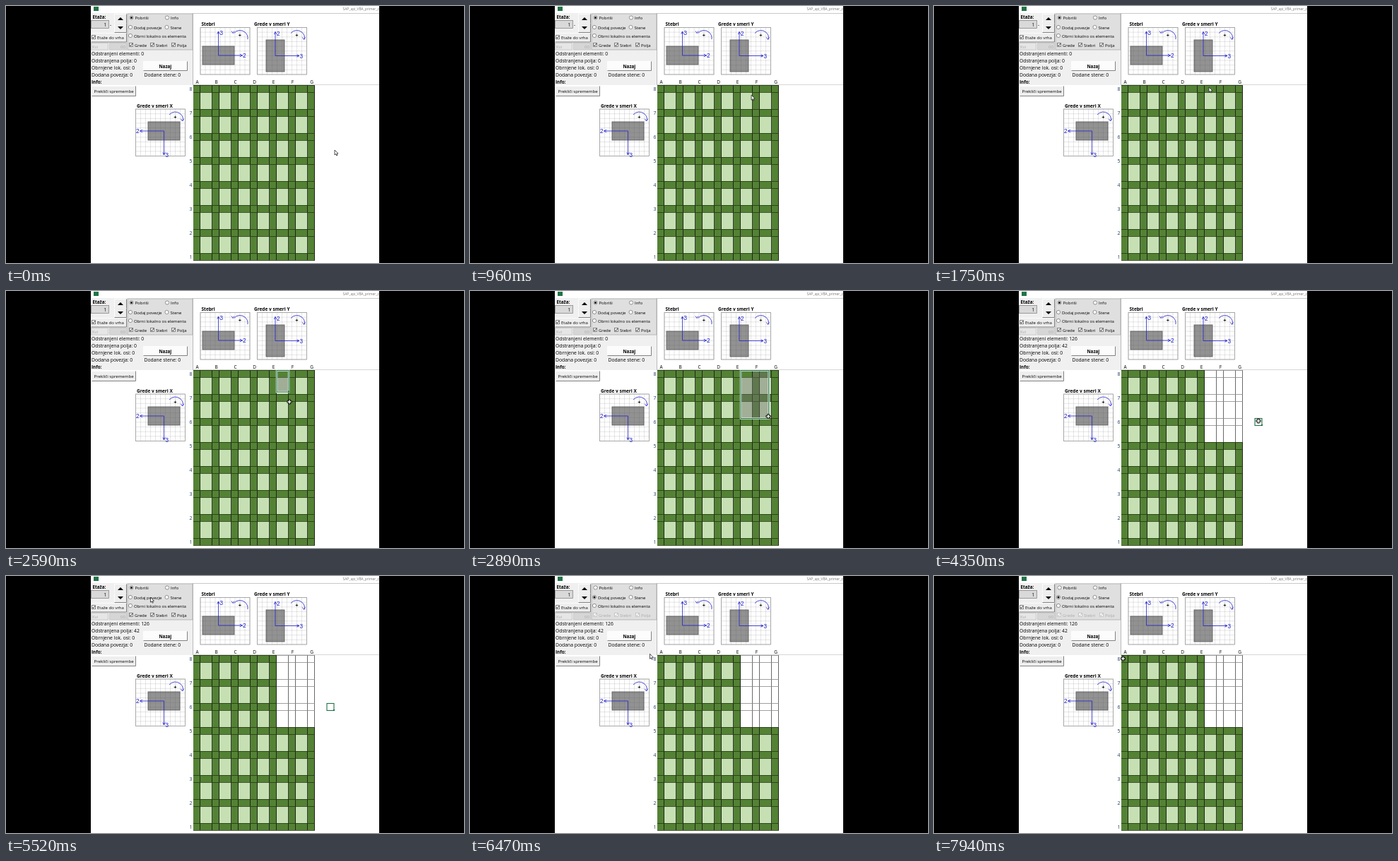
Write an HTML page with a canvas that moves like this. It is 648 px wide and 364 px high and loops after 8000 ms.

```html
<!DOCTYPE html>
<html lang="sl">
<head>
<meta charset="utf-8">
<style>
html, body { margin: 0; width: 100%; height: 100%; overflow: hidden; background: #000 }
canvas { display: block }
</style>
</head>
<body>
<canvas id="stage" width="648" height="364"></canvas>
<script>
const c = document.getElementById('stage').getContext('2d');
const LOOP = 8000, BLUE = '#2020d0', FONT = '"Open Sans", sans-serif';
const DRAG = 2410, CLEAR = 3530, CLICK = 4170, LINK = 5840;
const LEFT = 265, TOP = 112, COL = 27, ROW = 34, BEAM = 10;

// start, end, destination of each pointer move
const home = [465, 204];
const moves = [
  [330, 1110, 391, 118], [1140, 1430, 389, 115], [DRAG, 2590, 401, 157],
  [2590, 3200, 444, 199], [CLEAR, 4010, 459, 184], [4350, 4950, 293, 110],
  [4980, 5580, 202, 28], [LINK, 6620, 260, 119], [6650, 6920, 267.5, 117]
];

function pointerAt(t) {
  let [x, y] = home;
  for (const [start, end, toX, toY] of moves) {
    const u = Math.min(1, Math.max(0, (t - start) / (end - start))), e = u * u * (3 - 2 * u);
    x += (toX - x) * e;
    y += (toY - y) * e;
  }
  return [x, y];
}

// near and far edge of the sheet cell around v
function span(v, origin, pitch) {
  const start = origin + Math.floor((v - origin) / pitch) * pitch, mid = start + BEAM;
  return v < mid ? [start, mid] : [mid, start + pitch];
}

function box(x, y, w, h, fill, line) {
  if (fill) { c.fillStyle = fill; c.fillRect(x, y, w, h); }
  if (line) { c.strokeStyle = line; c.strokeRect(x, y, w, h); }
}

function text(s, x, y, size = 6.1, color = '#000', weight = 400, family = FONT) {
  c.font = `${weight} ${size}px ${family}`;
  c.fillStyle = color;
  c.fillText(s, x, y);
}

function path(points, fill, line, close) {
  c.beginPath();
  points.forEach(([x, y]) => c.lineTo(x, y));
  if (close) c.closePath();
  if (fill) { c.fillStyle = fill; c.fill(); }
  if (line) { c.strokeStyle = line; c.stroke(); }
}

function button(x, y, w, h, fill = '#eee') {
  box(x, y, w, h, fill);
  path([[x, y + h], [x, y], [x + w, y]], null, '#fff');
  path([[x + w, y], [x + w, y + h], [x, y + h]], null, '#666');
}

function dot(x, y, r, fill, line) {
  c.beginPath();
  c.arc(x, y, r, 0, 7);
  c.fillStyle = fill;
  c.fill();
  if (line) { c.strokeStyle = line; c.stroke(); }
}

function radio(x, y, label, on) {
  dot(x, y, 2.6, '#fff', '#777');
  if (on) dot(x, y, 1.5, '#000');
  text(label, x + 5, y + 2.5, 6);
}

function check(x, y, label, off) {
  const color = off ? '#aaa' : '#000';
  box(x - 2.5, y - 2.5, 5, 5, '#fff', off ? '#bbb' : '#666');
  path([[x - 1.7, y], [x - .5, y + 1.5], [x + 1.9, y - 1.8]], null, color);
  text(label, x + 5, y + 2.5, 6, color);
}

function arrow(x0, y0, x, y) {
  const a = Math.atan2(y - y0, x - x0);
  const wing = d => [x - 4 * Math.cos(a + d), y - 4 * Math.sin(a + d)];
  path([[x0, y0], [x, y]], null, BLUE);
  path([wing(.45), [x, y], wing(-.45)], null, BLUE);
}

// a section centred on (ox, oy) with two labelled axes and its turning sense
function diagram(title, tx, x, y, ox, oy, w, h, axes, ccw) {
  const W = 70, H = 66.5, block = [ox - w / 2, oy - h / 2, w, h];
  text(title, tx, y - 2.5, 6.5, '#000', 700);
  box(x, y, W, H, '#fff');
  box(...block, '#929292');
  c.lineWidth = .6;
  for (let i = 0; i <= 10; i++) {
    const gx = x + i * W / 10, gy = y + i * H / 10;
    path([[gx, y], [gx, y + H]], null, 'rgba(90,90,90,.25)');
    path([[x, gy], [x + W, gy]], null, 'rgba(90,90,90,.25)');
  }
  c.lineWidth = .8;
  box(x, y, W, H, null, '#999');
  box(...block, null, '#555');
  for (const [label, dx, dy] of axes) {
    const ex = ox + 34 * dx, ey = oy + 34 * dy;
    arrow(ox, oy, ex, ey);
    text(label, ex + (dx < 0 ? -5.5 : dx ? .5 : 2), ey + (dy < 0 ? 5 : 3), 8.2, BLUE, 400, '"Liberation Sans", sans-serif');
  }
  const cx = x + 56, cy = y + 15, s = ccw ? -1 : 1, tip = [cx + 10 * s, cy + (ccw ? -7 : 2)];
  c.beginPath();
  c.arc(cx, cy, 11, -2.45, .15);
  c.strokeStyle = BLUE;
  c.stroke();
  path([[tip[0] - 2 * s, tip[1] - 3], tip, [tip[0] + 2 * s, tip[1] - 3]], null, BLUE);
  text('+', cx - 2.3, cy - 1.5, 7.5, '#000', 700);
}

function plan(cleared) {
  for (let r = 0; r < 15; r++) for (let k = 0; k < 13; k++) {
    const x = LEFT + COL * (k >> 1) + k % 2 * BEAM, y = TOP + ROW * (r >> 1) + r % 2 * BEAM;
    const w = k % 2 ? COL - BEAM : BEAM, h = r % 2 ? ROW - BEAM : BEAM;
    const empty = cleared && k > 8 && r < 6;
    box(x, y, w, h, empty ? '#fff' : k % 2 && r % 2 ? '#c6e0b4' : '#548235');
    path([[x + w - .5, y], [x + w - .5, y + h]], null, empty ? '#444' : '#111');
    path([[x, y + h + .5], [x + w, y + h + .5]], null, empty ? '#888' : '#22380f');
    path([[x, y + .5], [x + w, y + .5]], null, empty ? '#888' : '#22380f');
  }
  c.textAlign = 'center';
  [...'ABCDEFG'].forEach((s, i) => text(s, LEFT + 5.5 + COL * i, TOP - 2.5, 6.5));
  c.textAlign = 'right';
  for (let i = 0; i < 8; i++) text(8 - i, LEFT - 1.7, TOP + 7.7 + ROW * i, 6.8, '#1f3864');
  c.textAlign = 'left';
}

function panel(t, cleared, linking) {
  box(120, 10, 144.5, 102, '#f0f0f0');
  box(172, 11, 92, 51, '#dfdfdf', '#aaa');
  text('Etaža:', 122.5, 18.3, 6.3, '#000', 700);
  box(120.5, 20.5, 25, 11, '#d9d9d9', '#888');
  text('1', 138.5, 28.6, 6.5);
  if (t < DRAG) text('-', 147, 28.5, 6.5);
  for (const [y, s] of [[18, -1], [31, 1]]) {
    button(153.5, y - 6.5, 17, 13);
    path([[158, y - 2 * s], [162, y + 2 * s], [166, y - 2 * s]], '#000');
  }
  button(120.5, 38.5, 50, 12.5);
  check(124, 44.2, 'Etaže do vrha');
  box(120.5, 52.5, 24, 9.5, '#e6e6e6', '#c4c4c4');
  text('Kvi', 122, 60, 6, '#aaa');
  box(146.5, 52.5, 24, 9.5, '#d6d6d6', '#c4c4c4');
  text('00', 162, 60, 6, '#aaa');

  radio(177.5, 16.5, 'Pobriši', !linking);
  radio(228, 16.5, 'Info');
  radio(176, 30, 'Dodaj povezje', linking);
  radio(227.5, 30, 'Stene');
  radio(176, 42, 'Obrni lokalno os elementa');
  ['Grede', 'Stebri', 'Polja'].forEach((s, i) => check(177 + 30 * i, 55, s, linking));

  [`Odstranjeni elementi: ${cleared ? 126 : 0}`, `Odstranjena polja: ${cleared ? 42 : 0}`,
   'Obrnjene lok. osi: 0', 'Dodana povezja: 0'].forEach((s, i) => text(s, 121, 69.7 + 10 * i, 6.8));
  text('Dodane stene: 0', 195.5, 99.7, 6.8);
  text('Info:', 121, 109.7, 6.3, '#000', 700);
  button(194.5, 78.5, 62, 13, '#fcfcfc');
  text('Nazaj', 216.5, 87.5, 6.3, '#000', 700);
  button(121.5, 113.5, 62, 14);
  text('Prekliči spremembe', 124.5, 123, 6.1);
}

function select(t) {
  if (t < DRAG || t >= LINK) return;
  const dragging = t < CLICK, shown = dragging ? Math.min(t, CLEAR) : CLICK;
  const [ax, ay] = pointerAt(dragging ? DRAG : CLICK);
  const [l, near] = span(ax, LEFT, COL), [top, under] = span(ay, TOP, ROW);
  // the frame glides after the pointer: average its last few cells
  let r = 0, b = 0;
  for (let lag = 60; lag <= 150; lag += 30) {
    const [x, y] = pointerAt(shown - lag * dragging);
    r += span(x, LEFT, COL)[1] / 4;
    b += span(y, TOP, ROW)[1] / 4;
  }
  if (dragging) {
    c.fillStyle = 'rgba(110,110,110,.43)';
    c.beginPath();
    c.rect(l, top, r - l, b - top);
    c.rect(l, top, near - l, under - top);
    c.fill('evenodd');
  }
  c.lineWidth = 2.4;
  box(l, top + .5, r - l, b - top, null, '#fff');
  c.lineWidth = 1.1;
  box(l, top + .5, r - l, b - top, null, '#217346');
  c.lineWidth = .8;
  box(r - 1, b - 1, 2, 2, '#217346');
}

function cursor(t) {
  const [x, y] = pointerAt(t);
  if (t < 1950 || (t > 4980 && x < 262)) {
    path([[0, 0], [0, 7], [1.6, 5.6], [2.8, 8], [3.9, 7.5], [2.8, 5.2], [5, 5]]
      .map(([dx, dy]) => [x + dx, y + dy]), '#fff', '#222', true);
    return;
  }
  for (const [long, thin, color] of [[3.5, 1.6, '#000'], [2.6, .7, '#fff']]) {
    box(x - long, y - thin, 2 * long, 2 * thin, color);
    box(x - thin, y - long, 2 * thin, 2 * long, color);
  }
}

function draw(now) {
  const t = now % LOOP, cleared = t >= CLEAR;
  c.lineWidth = .8;
  box(0, 0, 648, 364, '#000');
  c.save();
  c.beginPath();
  c.rect(120, 0, 408, 364);
  c.clip();
  box(120, 0, 408, 364, '#fff');
  box(124, 1, 7, 6, '#217346');
  text('SAP_api_VBA_primer_z', 476.5, 6, 4.9, '#777');
  path([[120, 10.5], [528, 10.5]], null, '#bbb');
  panel(t, cleared, t >= LINK);
  path([[264.5, 10], [264.5, 112]], null, '#aaa');
  path([[264, 111.5], [528, 111.5]], null, '#ccc');
  diagram('Stebri', 276.5, 275, 30.5, 300.5, 70, 45, 26, [['3', 0, -1], ['2', 1, 0]], true);
  diagram('Grede v smeri Y', 351, 355.5, 30.5, 381, 70.5, 26, 45, [['2', 0, -1], ['3', 1, 0]]);
  diagram('Grede v smeri X', 185, 183.5, 146, 223.5, 177, 45, 26, [['2', -1, 0], ['3', 0, 1]]);
  plan(cleared);
  select(t);
  cursor(t);
  c.restore();
  requestAnimationFrame(() => draw(performance.now()));
}
draw(0);
</script>
</body>
</html>
```
